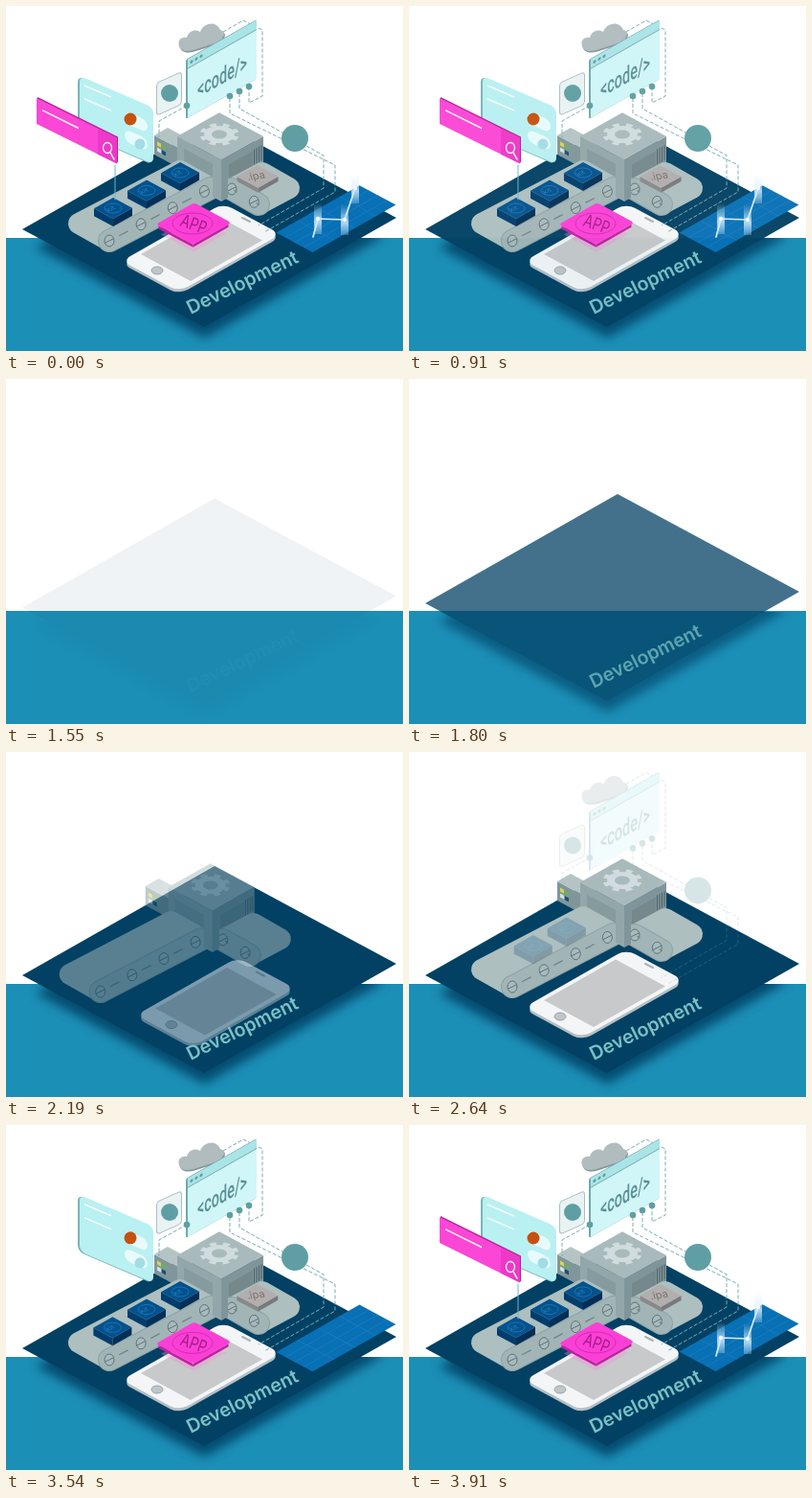
An HTML page for the animation above (3.96 s loop, 415x360 px).

```html
<!DOCTYPE html>
<html lang="en">
<head>
<meta charset="utf-8">
<style>
html, body { margin: 0; width: 100%; height: 100%; overflow: hidden; background: #fff; }
svg { display: block; }
text { font-family: Inter, Roboto, sans-serif; }
.dash { fill: none; stroke: #78adb0; stroke-dasharray: 4 2; }
.round { stroke-linejoin: round; stroke-linecap: round; }
</style>
</head>
<body>
<svg id="stage" width="415" height="360" viewBox="0 0 415 360"></svg>
<script>
const LOOP = 3960;
const DOWN = .537, UP = -.567; // slopes of the two floor axes
const STEP = {
  platform: [1530, 1950], factory: [1990, 2450], ideas: [2540, 3000],
  product: [3160, 3590], finish: [3640, 3910]
};
const clamp = v => Math.max(0, Math.min(1, v));
const repeat = (n, f) => Array.from({ length: n }, (_, i) => f(i)).join('');

const rect = (x, y, w, h, fill, r = 0) => `<rect x="${x}" y="${y}" width="${w}" height="${h}" rx="${r}" fill="${fill}"/>`;
const dot = (x, y, r, fill) => `<circle cx="${x}" cy="${y}" r="${r}" fill="${fill}"/>`;
const line = (d, color, width = 1) => `<path d="${d}" fill="none" stroke="${color}" stroke-width="${width}" class="round"/>`;
const label = (str, matrix, size, fill, extra = '') =>
  `<text transform="matrix(${matrix})" font-size="${size}" fill="${fill}" ${extra}>${str}</text>`;

// Local axes lying on the floor, or on an upright wall with a given slope.
const floor = (x, y, body) => `<g transform="matrix(1,${DOWN},1,${UP},${x},${y})">${body}</g>`;
const wall = (x, y, slope, body) => `<g transform="matrix(1,${slope},0,1,${x},${y})">${body}</g>`;

// Isometric box, placed by the centre of its top face.
function box(cx, cy, w, d, h, [top, left, right], r = 0) {
  const x = cx - (w + d) / 2, y = cy - (w * DOWN + d * UP) / 2;
  return wall(x, y, DOWN, rect(r, 0, w - r, h, left)) +
    wall(x + w, y + w * DOWN, UP, rect(0, 0, d - r, h, right)) +
    floor(x, y, rect(0, 0, w, d, top, r));
}

// A layer fades in during its step while sliding in from (dx, dy).
const layers = [];
const layer = (step, dx, dy, body) => {
  layers.push({ step, dx, dy });
  return `<g class="layer">${body}</g>`;
};

const slab = floor(17, 233, rect(0, 0, 190, 201, '#024164'));
const base = `<g clip-path="url(#water)"><g transform="translate(15 35) scale(.93)" filter="url(#blur)" opacity=".85">${slab}</g></g>` + slab;
const title = label('Development', '.87,-.42,.43,.87,193,322', 20.5, '#7dc0c4', 'font-weight="600"');

function belt(x, y, dx, dy, depthX, depthY, rollers) {
  const side = `M${x} ${y}l${dx} ${dy}`;
  const at = i => [x + i * 29 * Math.sign(dx / dy) * -1, y + i * 14.6 * Math.sign(dy)];
  return `<path d="${side}l${depthX} ${depthY}l${-dx} ${-dy}z" fill="#adbfbf" stroke="#adbfbf" stroke-width="22" class="round"/>` +
    line(side, '#8fa3a6', 24) + line(side, '#a2b5b6', 22) +
    repeat(rollers, i => {
      const px = x + dx * i / (rollers - .8), py = y + dy * i / (rollers - .8);
      return `<ellipse cx="${px}" cy="${py}" rx="5" ry="6" fill="#a9babc" stroke="#5d7478"/>` +
        line(`M${px - 4} ${py + 2}l8 -4`, '#5d7478') +
        line(`M${px + dx * .1} ${py + dy * .1}l${dx * .08} ${dy * .08}`, '#6f8589', 1.3);
    });
}

const gear = `<g transform="matrix(1,0,0,.57,223,134)" fill="none" stroke="#d0dcdd">
  <circle r="12" stroke-width="8"/><circle r="17.5" stroke-width="6" stroke-dasharray="6.87" transform="rotate(11)"/></g>`;
const steel = ['#a9babc', '#93a7aa', '#7f9599'];
const lamps = ['#d9d44b', '#6fae5c', '#cfe4e6', '#174f73'];
const machine =
  box(175, 138, 26, 14, 20, ['#b4c4c5', '#80969a', '#93a7aa']) +
  wall(155, 135, DOWN, lamps.map((c, i) => rect(3 + i % 2 * 5, 5 + (i >> 1) * 6, 4, 4, c)).join('')) +
  box(224, 136, 46, 44, 43, steel) +
  wall(179, 136, DOWN, rect(7, 9, 30, 34, '#869b9e')) +
  belt(108, 245, 106, -55, -32, -18, 4) +
  wall(225, 161, UP, rect(8, 9, 25, 34, '#75898d') + repeat(4, i => rect(34 + i * 2.5, 8, 1, 16, '#4c6165'))) +
  belt(236, 191, 28, 16, 32, -17, 2) +
  wall(179, 136, DOWN, rect(37, 0, 9, 43, steel[1])) +
  wall(225, 161, UP, rect(0, 0, 7, 43, steel[2])) + gear;

const phone =
  floor(121, 269, rect(0, 0, 60, 106, '#b4bfc4', 9)) +
  floor(121, 266, rect(0, 0, 60, 106, '#f3f5f6', 9) + rect(4, 16, 52, 75, '#c8c9ca')) +
  '<ellipse cx="158" cy="276" rx="6" ry="4" fill="#bfc5c8" stroke="#98a5aa"/>' +
  line('M247 221l8 4', '#a9b3b8', 2);

const block = i => `<g transform="translate(${112 + 35 * i} ${211 - 18.5 * i})">` +
  box(0, 0, 20, 20, 8, ['#03528e', '#013d6c', '#022f57']) +
  '<ellipse rx="9" ry="5" fill="none" stroke="#1a74b4"/>' +
  label('kit', '.87,-.4,.6,.6,-5,4', 8, '#2583bd') + '</g>';

const teal = '#5f9fa3';
const dashes = [
  'M227 27L248 15L268 25V94L254 101V86', 'M234 96V112L344 166V194L270 236',
  'M244 91V107L332 156V190L264 229', 'M189 104L160 120V137'
].map(d => `<path d="${d}" class="dash"/>`).join('');
const cloudShape = 'M181 42C179 36 183 32 189 33C191 25 199 24 203 27C207 16 222 16 223 25C229 25 229 31 226 33C228 37 220 39 215 40L196 46C189 48 182 47 181 42Z';
const cloud = `<path d="${cloudShape}" fill="#82979b" transform="translate(1 1.5)"/><path d="${cloudShape}" fill="#b0bcbd"/>`;
const ideas = dashes + cloud +
  wall(157, 80, -.45, rect(0, 0, 27, 35, '#a9bfc2', 4) + rect(1, 1, 25, 33, '#e9f3f4', 3)) +
  dot(171, 91, 9, teal) +
  wall(188, 56, UP, rect(0, 0, 74, 62, '#6fa9ad', 2) + rect(2, 1, 72, 61, '#d0f6f8') +
    rect(2, 1, 72, 9, '#a9e4e7') + rect(2, 10, 72, 1, '#6fa9ad') + repeat(3, i => dot(6 + i * 5, 5.5, 1.6, teal))) +
  label('&lt;code/&gt;', '.6,-.34,0,1,200,96', 24, '#5b8f93', 'style="font-family:Roboto,sans-serif" font-weight="500"') +
  dot(189, 104, 3.3, teal) + repeat(3, i => dot(234 + i * 10, 94 - i * 5, 3.3, teal)) +
  dot(302, 138, 14, teal);

const settings =
  wall(75, 73, .43, rect(0, 0, 78, 59, '#79b4b9', 6)) +
  wall(77, 73, .43, rect(0, 0, 77, 59, '#b9f0f2', 6) +
    repeat(2, i => rect(5, 7 + i * 14, 28, 1.6, '#fff') + rect(47, 16 + i * 19, 24, 13, '#e8fbfc', 6.5))) +
  dot(130, 118, 6.5, '#c5510f') + dot(140, 144, 5.5, '#a3dce5');

const search =
  line('M114 166V202', '#65b9d2') +
  wall(33, 95, .495, rect(0, 0, 84, 27, '#b61f96')) +
  wall(32, 96, .495, rect(0, 0, 84, 27, '#fb46d6') + rect(64, 0, 20, 27, '#ee38c8') + rect(6, 9, 38, 1.6, '#fff')) +
  '<ellipse cx="106" cy="148" rx="4.5" ry="5.5" fill="none" stroke="#fff" stroke-width="1.3"/>' +
  line('M109 153l4 7', '#fff', 1.5);

const brick =
  box(263, 178, 22, 21, 5, ['#b3aeae', '#87898b', '#77797c']) +
  label('.ipa', '.9,-.12,.25,.85,253,182', 12, '#77716f');

const app =
  `<g opacity=".35">${box(196, 238, 34, 34, 0, ['#f58fdc'])}</g>` +
  box(196, 227, 39, 40, 3, ['#fb3fd6', '#c021a0', '#c021a0'], 3) +
  '<ellipse cx="195" cy="227" rx="21" ry="11" fill="none" stroke="#d02cb0"/>' +
  label('APP', '.74,.26,-.35,.95,181,229', 18, '#a51c8a');

const chart = floor(282.5, 236.5, rect(0, 0, 38, 87, '#0870b5') +
  repeat(3, i => rect(9.5 * (i + 1), 0, .5, 87, '#2581c0') + rect(0, 22 * (i + 1), 38, .5, '#2581c0')));
const nodes = [[326, 222], [354, 223], [365, 190]];
const graph = nodes.map(([x, y]) => rect(x - 4, y - 16, 8, 32, 'url(#glow)')).join('') +
  line(`M321 241L${nodes.join('L')}`, '#d3ecfb', 1.7) + nodes.map(([x, y]) => dot(x, y, 2.2, '#eef8ff')).join('');

const scene =
  layer('platform', 0, 6, base) +
  layer('factory', -26, 14, machine) +
  layer('factory', 42, 24, phone) +
  layer('platform', 0, 6, title) +
  layer('ideas', 0, 10, ideas) +
  layer('ideas', -27, 15, block(2) + block(1)) +
  layer('product', -30, 16, block(0)) +
  layer('product', -12, -7, brick) +
  layer('product', 0, 16, app) +
  layer('product', 0, 22, chart) +
  layer('product', 0, -9, settings) +
  layer('finish', -11, -6, search) +
  layer('finish', 0, 8, graph);

stage.innerHTML = `<defs>
  <clipPath id="water"><rect y="242" width="415" height="118"/></clipPath>
  <filter id="blur"><feGaussianBlur stdDeviation="6"/></filter>
  <linearGradient id="glow" x2="0" y2="1">
    <stop stop-color="#d9f0ff" stop-opacity="0"/><stop offset=".6" stop-color="#d9f0ff" stop-opacity=".8"/>
    <stop offset="1" stop-color="#d9f0ff" stop-opacity=".25"/></linearGradient></defs>` +
  rect(0, 0, 415, 360, '#fff') + rect(0, 242, 415, 118, '#1c8fb7') + `<g id="scene">${scene}</g>`;

const sceneEl = document.getElementById('scene');
const layerEls = document.querySelectorAll('.layer');

function draw(t) {
  const leaving = t < 1490;
  sceneEl.setAttribute('opacity', leaving ? 1 - clamp((t - 890) / 580) : 1);
  layers.forEach(({ step, dx, dy }, i) => {
    const [start, end] = STEP[step];
    const p = leaving ? 1 : clamp((t - start) / (end - start));
    const left = (1 - p) ** 1.8;
    layerEls[i].setAttribute('opacity', clamp(p * 1.15));
    layerEls[i].setAttribute('transform', `translate(${dx * left} ${dy * left})`);
  });
}

const begin = performance.now();
function tick() {
  draw((performance.now() - begin) % LOOP);
  requestAnimationFrame(tick);
}
tick();
</script>
</body>
</html>
```
